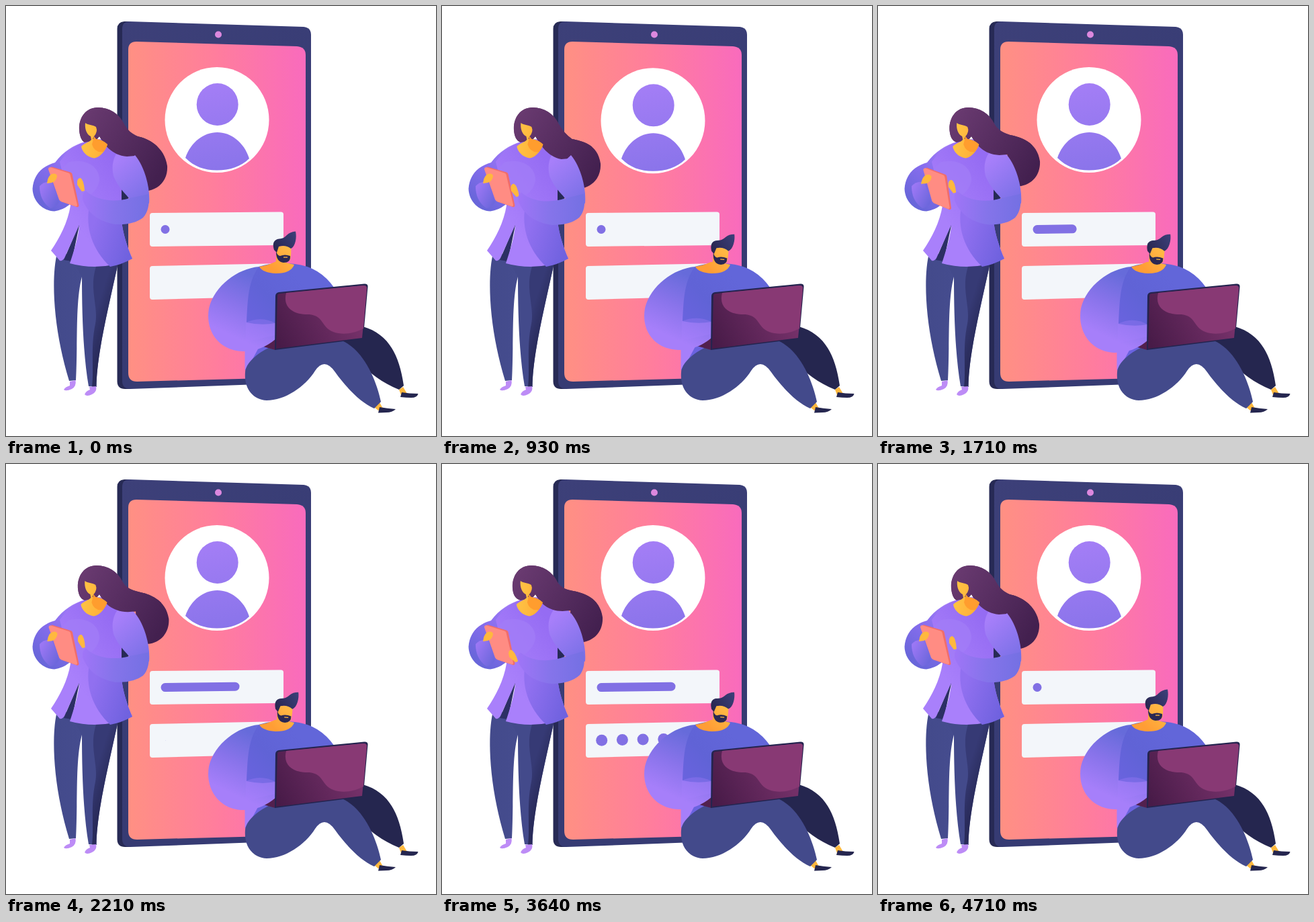
These frames come from a looping animation (640 by 640 pixels, 4780 ms). An HTML page:

```html
<!DOCTYPE html>
<html lang="en">
<head>
<meta charset="utf-8">
<title>Sign in</title>
<style>
html, body { margin: 0; width: 100%; height: 100%; overflow: hidden; background: #fff; }
svg { display: block; width: 100vw; height: 100vh; }
</style>
</head>
<body>
<svg viewBox="0 0 640 640">
  <defs id="defs">
    <clipPath id="shoulder"><path d="M90 140H260V196L192 222L177 236H90Z"/></clipPath>
  </defs>

  <!-- phone -->
  <path fill="#272a55" d="M183 23H176Q165.500 24 165.500 34V559Q166 570 177 570H186Z"/>
  <path fill="url(#body)" d="M184 23L443 31Q454 32 454 43V548L430 561L185 570Q173 570 173 558V34Q173 23 184 23Z"/>
  <path fill="url(#screen)" d="M194 53L433 60Q446 61 446 73V545L420 553L195 559Q182 559 182 546V65Q182 53 194 53Z"/>
  <circle cx="316" cy="42.5" r="5" fill="#dc88de"/>

  <g id="avatar">
    <ellipse cx="314" cy="169.5" rx="77.5" ry="78.5" fill="#fff"/>
    <ellipse cx="314.700" cy="146.5" rx="31" ry="31.5" fill="url(#user)"/>
    <path fill="url(#user)" d="M267 226C275 202 295 188 314.500 188S354 202 362 227C350 239 333 244.500 314 244.500S280 239 267 226Z"/>
  </g>

  <g fill="#f3f6fa">
    <path d="M218 308L409 306.500Q413 306.500 413 310V352Q413 355.500 409 356L218 358Q214 358 214 354V312Q214 308 218 308Z"/>
    <path d="M218 387L413 383V432L218 437Q214 437 214 433V391Q214 387 218 387Z"/>
  </g>
  <path id="bar" stroke="#8170e4" stroke-width="13" stroke-linecap="round"/>
  <g id="dots" fill="#8170e4"></g>

  <!-- woman -->
  <path class="hair" fill="url(#hair)"/>
  <path fill="url(#legL)" d="M76 368C67 405 70 480 94 558L104 557C107 500 103 440 113 403L126 372Z"/>
  <path fill="#434a8b" d="M96 372L113 403C113 460 115 520 123 566L134.500 567C135 520 151 455 167 382Z"/>
  <path fill="url(#legR)" d="M137 380C120 420 140 446 132 478C126 510 131 540 128 566.500L134.500 567C135 520 151 455 167 382Z"/>
  <g fill="#bd8cf6">
    <path d="M95 559L103.500 557Q105 566 98 570Q89 574 86 571Q88 567 95 565Z"/>
    <path d="M124 567L134 566Q136 574 128 578Q120 582 117 578Q119 573 125 571Z"/>
  </g>
  <path fill="#2c2f64" d="M110 322L86 378L98 380Z"/>
  <path fill="url(#cuff)" d="M118 202C100 207 85 217 73 233C55 238 41 250 39.500 272C40 291 55 305 72 305.500Q84 304 94 296L120 260Z"/>
  <path fill="url(#cuffIn)" d="M50 268Q59 259 69 263L79 292Q75 300 66 301Q50 290 50 268Z"/>
  <path fill="url(#coat)" d="M114 204Q130 196 150 199C170 205 178 216 183 222L172 275V320C174 338 180 358 188 376Q142 396 95 383C102 362 108 342 109 326L87 375Q84 380 80 379L67 364C80 345 92 322 96 297L80 232Q95 210 114 204Z"/>
  <path fill="url(#fold)" d="M124 298C118 330 128 362 155 388Q172 385 188 376C180 358 174 338 172 320L160 295Z"/>
  <path fill="#a27cf7" opacity=".75" d="M92 233C113 226 139 236 139 258C138 274 124 285 108 289L99 251L84 242Z"/>
  <path fill="#272a55" d="M172 274L183.500 285L172 291Z"/>
  <path fill="url(#sleeve)" d="M163 222Q170 209 182 213Q188 217 192 222C207 240 215 272 213 294L183 286C178 279 168 272 160 253Q156 236 163 222Z"/>

  <g id="tablet">
    <path fill="#f06d6b" d="M67 239L96 247.500Q98 248 98.500 250L108.500 297Q108 300 105 299L82 291Z"/>
    <path fill="#ff8c83" d="M66 240L93 248.500Q95 249 95.500 251L106 296Q106 299 103 298L82 291Q80 290 79 288L63 243Q63 240 66 240Z"/>
    <path fill="#ffb83e" d="M61 264Q62 253 68 250Q75 248 76 253Q75 261 68 263Z"/>
  </g>
  <g id="hand">
    <path fill="#ffb83e" d="M106 261Q107 256 111 256Q116 259 117 275L113 276Q109 271 106 266Z"/>
  </g>
  <path id="forearm" fill="url(#forearm-fill)" d="M114 288Q113 277 119 275C135 291 165 292 184 286L212 280Q215 303 204 315Q190 326 163 325C138 321 121 308 114 288Z"/>

  <path class="hair" fill="url(#hair)" clip-path="url(#shoulder)"/>
  <g id="face">
    <path fill="url(#skin)" d="M118 174C123 178 128 176 134 180Q137 187 131 194L129 198C140 197 148 203 151 206C146 220 137 226 131 226.500C120 225 113 216 112 209C117 204 125 202 127 199L126 194C120 191 117 183 118 174Z"/>
    <path fill="#ff9d2e" d="M131 194L128 206Q132 219 145 217Q150 211 151 206Q144 199 134 198Z"/>
  </g>

  <!-- man -->
  <path fill="#25264f" d="M531 477C569 488 585 518 592 565L585 571C560 561 540 546 525 528L498 498Z"/>
  <g fill="#ffb83e">
    <path d="M585 571L591 567L597 577L588 579Z"/>
    <path d="M548 597L556 590L561 599L554 602Z"/>
  </g>
  <path fill="url(#torso)" d="M376 388Q400 380 430 384Q467 388 489 420L425 505L380 535L356 542V506L345 470Q345 420 376 388Z"/>
  <path fill="#a67ffa" d="M355.500 505H378L362 535L355.500 542Z"/>
  <path fill="#434a8b" d="M356 545C357 530 378 513 400 505L500 498C531 511 551 555 558 589L548 599C527 590 505 566 490 545Q474 522 460 543C445 567 415 587 388 587C367 586 354 569 356 545Z"/>
  <g fill="#25264f">
    <path d="M587 582L589 575Q600 577 613.500 577Q612 583 603 583Q596 583 587 582Z"/>
    <path d="M554 605.500L556 597Q567 599 580 600Q575 605 566 605Z"/>
  </g>
  <path fill="#52204e" d="M370 501L401 488V512Q386 508 370 503Z"/>
  <path id="arm" fill="url(#arm-fill)"/>
  <path id="wrist" fill="#a67ffa" opacity=".3"/>
  <path fill="#24244f" d="M401 432Q401 427 406 426L533 413.500Q539 413 538.500 418L532 490Q531 495 526 496L400 512Z"/>
  <path fill="url(#lid)" d="M404 431Q404 428 408 428L532 416Q537 416 537 420L530 494L402 510Z"/>
  <path fill="#883974" d="M417 427L532 416Q537 416 537 420L532 480C518 488 500 490 487 485C468 477 474 462 452 459C430 460 411 450 417 427Z"/>
  <path fill="url(#skin2)" d="M377 388Q390 386 400 381H412Q421 383 429 385Q424 398 402 398Q382 397 377 388Z"/>
  <g id="head">
    <path fill="url(#skin2)" d="M402 358L424 356Q425 370 423 378L412 383L411 390H399L402 378Z"/>
    <path fill="#2a2853" d="M402 365Q404 372 408 372Q415 369 423 372Q424 382 413 382Q403 381 402 368Z"/>
    <path fill="none" stroke="#ffb83e" stroke-width="1.300" d="M413 374H419"/>
    <path fill="url(#quiff)" d="M399 363Q395 350 404 347C412 346 414 345 418 341Q423 336 431 335.500C433 344 431 358 424 361Q416 355 406 358Q404 364 403 367Z"/>
  </g>
</svg>
<script>
const LOOP = 4780;
const NS = 'http://www.w3.org/2000/svg';
const $ = id => document.getElementById(id);

function add(parent, tag, attrs) {
  const el = parent.appendChild(document.createElementNS(NS, tag));
  for (const k in attrs) el.setAttribute(k, attrs[k]);
  return el;
}

// id, x1, y1, x2, y2, evenly spaced colours
const gradients = [
  ['body', 180, 0, 454, 300, '#3d4079', '#363b73'],
  ['screen', 182, 0, 446, 0, '#ff9083', '#ff7d9d', '#f96bbd'],
  ['user', 300, 115, 325, 245, '#a47ef6', '#8a74ea'],
  ['hair', 112, 165, 235, 240, '#693a70', '#43204f'],
  ['legL', 70, 0, 112, 0, '#434a8b', '#454c8e'],
  ['legR', 128, 470, 152, 478, '#363a75', '#292b5a'],
  ['cuff', 50, 290, 110, 215, '#6966da', '#866ded', '#a27cf7'],
  ['cuffIn', 50, 275, 78, 290, '#9b77f4', '#6d67dc'],
  ['coat', 85, 300, 165, 240, '#a980fb', '#956cf3'],
  ['fold', 125, 340, 185, 360, '#9170f0', '#7062df'],
  ['sleeve', 165, 230, 213, 285, '#a77ffa', '#7a70e6'],
  ['forearm-fill', 114, 290, 212, 300, '#9f75f7', '#8574ea', '#7470e3'],
  ['skin', 115, 200, 150, 206, '#ffc244', '#ffae37'],
  ['skin2', 396, 390, 424, 362, '#ff9d35', '#ffbb45'],
  ['torso', 365, 480, 440, 410, '#6a63df', '#6063d6', '#6266d9'],
  ['arm-fill', 375, 405, 335, 490, '#666bda', '#8873ea', '#a67ffa'],
  ['lid', 405, 500, 520, 440, '#481b48', '#7a336d'],
  ['quiff', 400, 360, 430, 340, '#292751', '#3b3e77']
];
for (const [id, x1, y1, x2, y2, ...stops] of gradients) {
  const g = add($('defs'), 'linearGradient', { id, x1, y1, x2, y2, gradientUnits: 'userSpaceOnUse' });
  stops.forEach((color, i) => add(g, 'stop', { offset: i / (stops.length - 1), 'stop-color': color }));
}

// [time, value, ...]; tail holds x, y and the lift of its middle
const tracks = {
  bob: [[0, 0], [140, -4.8], [360, 4], [640, -3], [930, 1.3], [1280, 0]],
  bar: [[1210, 0], [2210, 1], [4000, 1], [4680, 0]],
  tail: [[0, 0, 0, 0], [360, -1, 0, 1], [930, -4, -3.5, 4], [1710, 1, -7, -2], [2790, 4, -8, -6], [3640, -1, -10, -5], [LOOP, 0, 0, 0]],
  head: [[0, 0], [360, -.5], [930, -2], [1710, -2.5], [2790, -1.5], [3640, -4], [LOOP, 0]],
  tap: [[0, 0], [360, -12], [930, -6], [1710, -2], [2790, 6], [3640, -14], [LOOP, 0]],
  tablet: [[1210, 0], [1710, 1], [2360, 0]],
  nod: [[0, 0], [360, .68], [600, 1], [3500, 1], [4600, 0]],
  arm: [[0, 0], [360, -4], [930, -2], [1710, 2], [2790, 0], [3640, 0], [LOOP, 0]]
};

function at(keys, t) {
  const i = keys.findIndex(k => k[0] > t);
  if (i < 0) return keys[keys.length - 1].slice(1);
  if (i === 0) return keys[0].slice(1);
  const a = keys[i - 1], b = keys[i];
  const p = (1 - Math.cos(Math.PI * (t - a[0]) / (b[0] - a[0]))) / 2;
  return a.slice(1).map((v, n) => v + (b[n + 1] - v) * p);
}

const dots = [0, 1, 2, 3].map(i => add($('dots'), 'circle', { cx: 237.7 + i * 30.7, cy: 411.2 - i * .6 }));
const hair = document.querySelectorAll('.hair');

function hairPath(h, dx, dy, mid) {
  const top = (x, y) => `${x + h} ${y}`;
  const bend = (x, y, w) => `${x + dx * .6 * w} ${y + mid * w}`;
  const tail = (x, y) => `${x + dx} ${y + dy}`;
  return `M${top(137, 151)}C${top(118, 151)} ${top(108, 167)} ${top(109, 185)}`
    + `C${top(110, 194)} ${top(112, 200)} 117 203L134 200L139 194`
    + `C146 206 157 ${bend(0, 222, .6).split(' ')[1]} ${bend(180, 224, 1)}L${bend(192, 223, 1)}`
    + `L190 270L${tail(212, 275)}C${tail(231, 271)} ${tail(241, 256)} ${tail(240, 238)}`
    + `C${tail(236, 209)} ${bend(211, 197, 1)} ${bend(196, 194, 1)}`
    + `C${bend(187, 190, .6)} ${top(181, 185)} ${top(176, 176)}C${top(168, 160)} ${top(154, 151)} ${top(137, 151)}Z`;
}

function draw(t) {
  const v = {};
  for (const k in tracks) v[k] = at(tracks[k], t);
  const move = (id, value) => $(id).setAttribute('transform', value);

  move('avatar', `translate(0 ${v.bob})`);
  $('bar').setAttribute('d', `M237 332.500L${237.01 + 104 * v.bar} ${332.5 - 1.3 * v.bar}`);
  dots.forEach((dot, i) => {
    const start = 2190 + i * 260;
    const [r] = at([[start, 0], [start + 200, 8.5], [3900, 8.5], [4300, 0]], t);
    dot.setAttribute('r', r);
  });

  const d = hairPath(v.head[0], ...v.tail);
  hair.forEach(el => el.setAttribute('d', d));
  move('face', `translate(${v.head * .3} 0)`);
  move('hand', `rotate(${v.tap} 190 300)`);
  move('forearm', `rotate(${v.tap * .3} 195 302)`);
  move('tablet', `translate(${2.5 * v.tablet} ${2.5 * v.tablet}) rotate(${4 * v.tablet} 85 270)`);

  move('head', `translate(0 ${2 * v.nod}) rotate(${4.5 * v.nod} 403 390)`);
  const a = v.arm[0];
  $('arm').setAttribute('d', `M376 388C345 391 310 416 302 450C296 485 318 ${513 + a} 352 ${514 + a}`
    + `C373 ${514 + a} 388 ${507 + a} 401 ${496 + a}V${472 + a}Q380 ${476 + a} 358 ${471 + a}C360 435 360 412 376 388Z`);
  $('wrist').setAttribute('d', `M357 ${471 + a}Q380 ${461 + a * .5} 401 ${472 + a}V${490 + a}L357 ${500 + a}Z`);
}

function tick() {
  draw(performance.now() % LOOP);
  requestAnimationFrame(tick);
}
tick();
</script>
</body>
</html>
```
